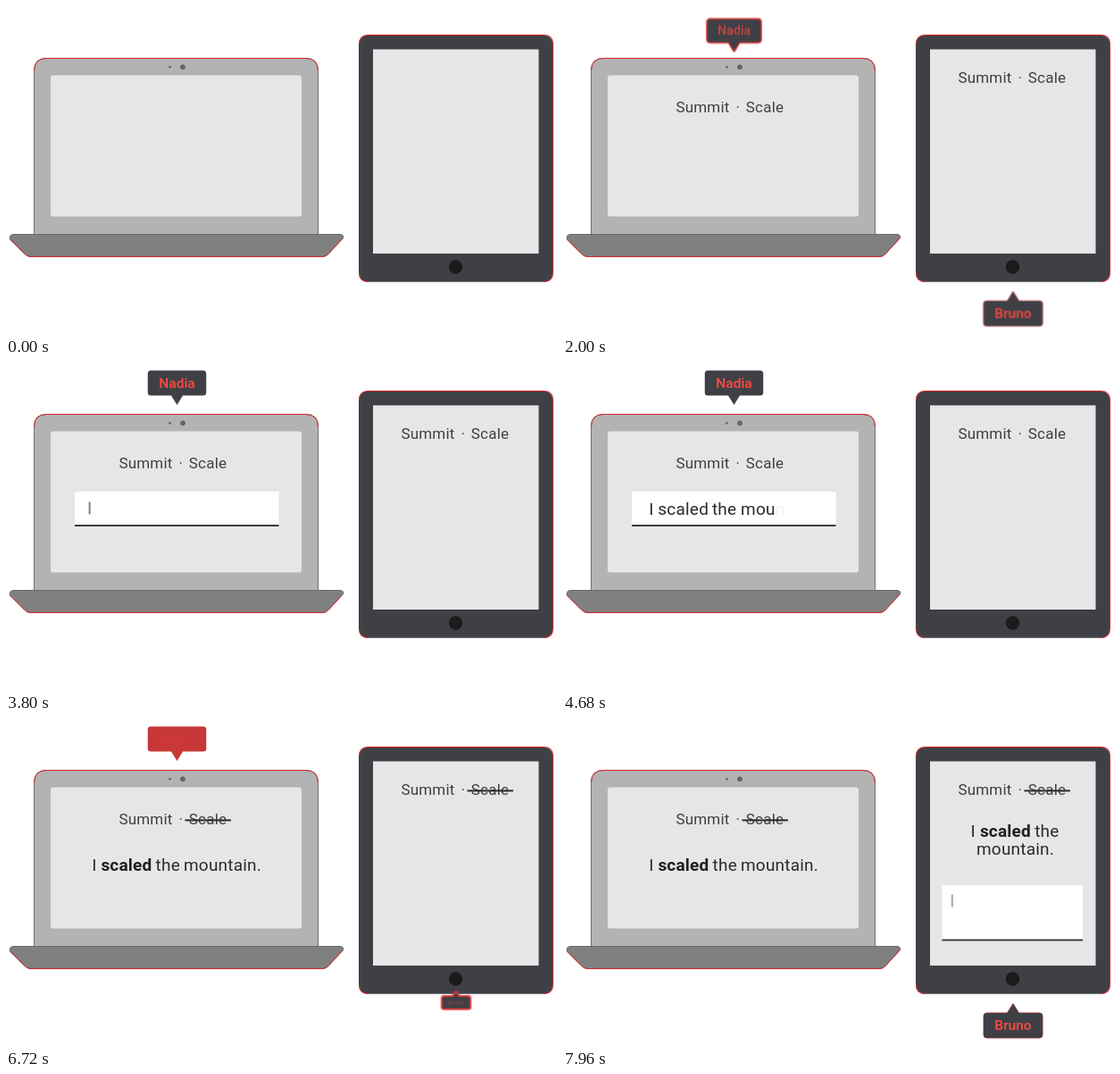
An HTML page for the animation above (8000 ms loop, 617 by 367 pixels).

```html
<!DOCTYPE html>
<html lang="en">
<head>
<meta charset="utf-8">
<title>Two devices</title>
<style>
  html, body { margin: 0; width: 100%; height: 100%; overflow: hidden; background: #fff; }
  svg { display: block; width: 617px; height: 367px; }
  text { font-family: Roboto, "Open Sans", sans-serif; }
  .title { font-size: 17px; letter-spacing: .2px; fill: #3f4045; }
  .line { font-size: 19px; letter-spacing: .2px; fill: #2b2b2f; }
  .strong { font-weight: 700; fill: #1f1f22; }
  .tag { font-size: 15.5px; font-weight: 500; text-anchor: middle; fill: #ff4a42; }
  .edge { fill: none; stroke: #d8262a; stroke-width: 1; }
</style>
</head>
<body>
<svg id="stage" viewBox="0 0 617 367">
  <!-- laptop -->
  <path d="M31.5 255.5V72.5q0-14 14-14H335.500q14 0 14 14V255.500z" fill="#b3b3b3" stroke="#707070"/>
  <path class="edge" d="M31.500 72.500q0-14 14-14H335.500q14 0 14 14"/>
  <rect x="50" y="77.500" width="281" height="158" rx="3" fill="#e6e6e6"/>
  <circle cx="183.500" cy="68.300" r="1.400" fill="#666"/>
  <circle cx="198" cy="68.300" r="2.900" fill="#666"/>
  <path d="M8 255.500H375q4 1 2.500 4L361 277.500q-3 3-7 3H28q-4 0-7-3L4.500 261q-1.500-4.500 3.500-5.500z" fill="#808080" stroke="#6c6c6c"/>
  <path class="edge" d="M377.500 259.500L361 277.500q-3 3-7 3H28q-4 0-7-3L4.500 261"/>
  <!-- tablet -->
  <rect x="395" y="32.500" width="217.500" height="276.300" rx="10" fill="#3f4045"/>
  <path class="edge" d="M395.500 42.500q0-10 10-10H602.500q10 0 10 10V298.500q0 10-10 10M405 308.500q-9.500 0-9.500-10"/>
  <rect x="411" y="48.500" width="185.500" height="228.500" fill="#e6e6e6"/>
  <circle cx="503.500" cy="292" r="7.700" fill="#1b1b1b"/>
</svg>
<script>
const LOOP = 8000;
const DARK = '#3f4045', RED = '#c83737';
const BACK = 'cubic-bezier(.34,1.56,.64,1)';
const stage = document.getElementById('stage');

function add(tag, attrs, parent = stage, text) {
  const el = document.createElementNS('http://www.w3.org/2000/svg', tag);
  for (const k in attrs) el.setAttribute(k, attrs[k]);
  if (text) el.textContent = text;
  parent.appendChild(el);
  return el;
}

// rows: [ms, properties, easing]
function anim(el, rows) {
  const all = [[0, rows[0][1]], ...rows, [LOOP, rows[rows.length - 1][1]]];
  const frames = all.map(([t, props, easing = 'linear']) => ({ offset: t / LOOP, easing, ...props }));
  el.animate(frames, { duration: LOOP, iterations: Infinity });
}

// steps: [ms, opacity]
const fade = (el, ...steps) => anim(el, steps.map(([t, opacity]) => [t, { opacity }]));

function title(x, y) {
  const el = add('text', { class: 'title', y });
  [['Summit', 126.4], ['·', 193.5], ['Scale', 204.8]].forEach(([word, dx]) =>
    add('tspan', { x: x + dx }, el, word));
  fade(el, [1160, 0], [1400, 1]);

  const strike = add('rect', { x: x + 200.5, y: y - 5.2, width: 51.4, height: 2, fill: '#2b2b2f' });
  strike.style.transformOrigin = `${x + 200.5}px 0px`;
  anim(strike, [[6000, { transform: 'scaleX(0)' }], [6240, { transform: 'scaleX(1)' }]]);
}

// words: [text, x, y, strong]
function sentence(words) {
  const el = add('g', {});
  for (const [word, x, y, strong] of words)
    add('text', { class: strong ? 'line strong' : 'line', x, y }, el, word);
  return el;
}

function typed(words, y, start, pace) {
  const el = add('g', {});
  let i = 0;
  for (const [word, x] of words) {
    const line = add('text', { class: 'line', x, y }, el);
    for (const ch of word) {
      const t = start + pace * i++;
      anim(add('tspan', {}, line, ch), [[t, { fillOpacity: 0 }], [t + 50, { fillOpacity: 1 }]]);
    }
    i++; // space
  }
  return el;
}

function field(x, y, width, height) {
  const el = add('g', {});
  add('rect', { x, y, width, height, fill: '#fff' }, el);
  add('rect', { x, y: y + height - 2, width, height: 2, fill: '#3a3a3e' }, el);
  return el;
}

const cursor = (x, y) => add('rect', { x, y, width: 2, height: 14, fill: DARK });

// dir: 1 when the tag hangs below its tip, -1 when it stands above; shows: [in, out]
function bubble(name, cx, tip, dir, width, border, shows) {
  const g = add('g', {});
  g.style.transformOrigin = `${cx}px ${tip - 23 * dir}px`;
  const near = tip + 10.5 * dir, far = near + 28 * dir, w = width / 2, r = 3.5, c = r * dir;
  const body = add('path', {
    d: `M${cx} ${tip}L${cx + 6.5} ${near}H${cx + w - r}q${r} 0 ${r} ${c}V${far - c}q0 ${c} ${-r} ${c}` +
       `H${cx - w + r}q${-r} 0 ${-r} ${-c}V${near + c}q0 ${-c} ${r} ${-c}H${cx - 6.5}z`,
    fill: DARK, stroke: '#e23636', 'paint-order': 'stroke', 'stroke-linejoin': 'round'
  }, g);
  const label = add('text', { class: 'tag', x: cx, y: (near + far) / 2 + 5.2 }, g, name);

  const move = [], skin = [], ink = [];
  const pose = (s, opacity) => ({ transform: `scale(${s})`, opacity });
  const coat = (fill, px) => ({ fill, strokeWidth: px + 'px' });
  for (const [t, out] of shows) {
    move.push([t, pose(0, 0)], [t, pose(0, 1), BACK], [t + 360, pose(1, 1)]);
    skin.push([t, coat(DARK, 12)], [t + 108, coat(DARK, 3.2)],
      [t + 220, coat(DARK, 1.2)], [t + 420, coat(DARK, border)]);
    ink.push([t, { opacity: 0 }], [t + 150, { opacity: 1 }]);
    if (out) {
      move.push([out + 120, pose(1, 1)], [out + 300, pose(1, 0)]);
      skin.push([out, coat(DARK, border)], [out + 90, coat(RED, 0)]);
      ink.push([out, { opacity: 1 }], [out + 90, { opacity: .1 }]);
    }
  }
  anim(g, move);
  anim(body, skin);
  anim(label, ink);
}

title(0, 118.6);
title(316, 85.6);

// laptop entry
const entry = field(77, 145, 228.5, 39);
fade(entry, [3000, 0], [3320, 1], [5750, 1], [5750, 0]);
const typing = typed([['I', 96.2], ['scaled', 106.3], ['the', 166.9], ['mountain.', 199]], 170.5, 3830, 53);
fade(typing, [5750, 1], [5750, 0]);
fade(cursor(92.6, 156.5), [3300, 0], [3560, 1], [3760, 1], [3800, .65], [3880, 0]);
fade(cursor(286.6, 156.5), [5040, 0], [5320, 1], [5600, 1], [5720, .13], [5750, 0]);

const done = sentence([['I', 96.2, 170.5], ['scaled', 106.4, 170.5, true],
  ['the', 167.6, 170.5], ['mountain.', 199, 170.5]]);
fade(done, [5750, 0], [5750, 1]);

// tablet reply
const copy = sentence([['I', 456.4, 132.5], ['scaled', 466.9, 132.5, true],
  ['the', 528.2, 132.5], ['mountain.', 463, 152.5]]);
fade(copy, [6900, 0], [7240, 1]);
fade(field(424.5, 187, 157.5, 62.5), [7400, 0], [7760, 1]);
fade(cursor(434.8, 197.5), [7760, 0], [7960, .45], [8000, .55]);

bubble('Nadia', 191.5, 48, -1, 65.5, 0, [[1892, 6620]]);
bubble('Bruno', 504, 319.5, 1, 66, 1, [[1650, 2860], [6679]]);
</script>
</body>
</html>
```
